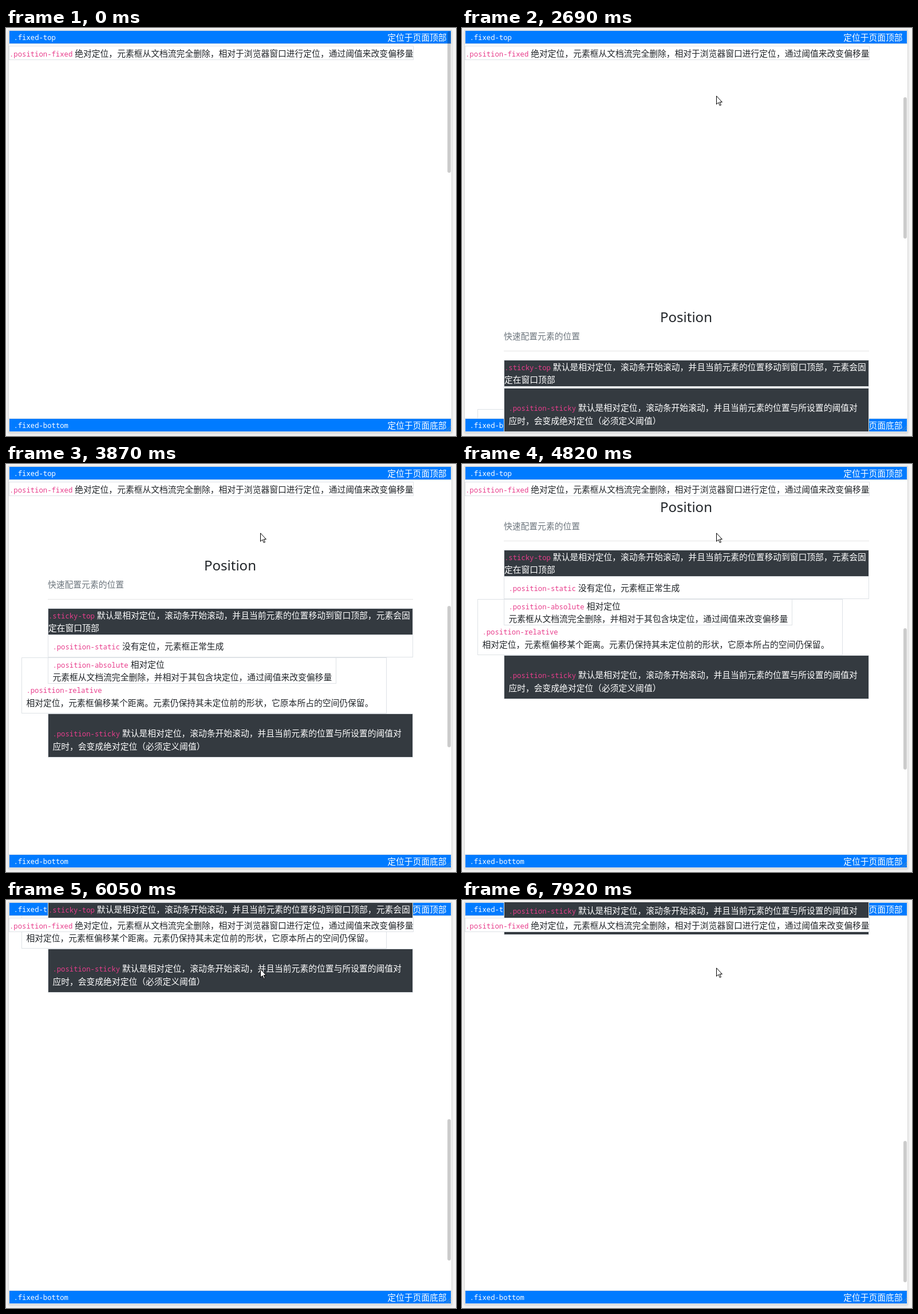
Write an HTML page that moves like this. It is 786 px wide and 713 px high and loops after 8000 ms.

```html
<!DOCTYPE html>
<html lang="zh-CN">
<head>
<meta charset="utf-8">
<title>Position</title>
<style>
html, body { margin: 0; width: 100%; height: 100%; overflow: hidden; background: #f5f5f5; }
body {
  position: relative; color: #212529; white-space: nowrap;
  font: 14.79px/22.3px "Noto Sans CJK SC", "Noto Sans CJK", sans-serif;
}
div, h2, p, hr, svg { position: absolute; margin: 0; box-sizing: border-box; }
code { font: 12.25px/0 "Noto Sans Mono", monospace; color: #e83e8c; margin-right: 4px; }
#frame { left: 5px; top: 4px; width: 773px; height: 702px; background: #fff;
  box-shadow: 0 0 0 1px #ddd, 0 2px 4px 1px rgba(0, 0, 0, .13); }
#view { inset: 0; clip-path: inset(4px 8px 7px 5px); }
#flow { left: 0; top: 0; width: 786px; }
h2 { left: 73px; top: 789px; width: 637px; text-align: center; font: 24px/32px "Noto Sans", sans-serif; }
p { left: 73px; top: 827px; color: #6c757d; }
hr { left: 73px; top: 864px; width: 638px; height: 1px; border: 0; background: #e5e5e5; }
.box { border: 1px solid #dee2e6; left: 73px; width: 638px; padding: 0 7.4px; }
.dark { background: #343a40; color: #fff; top: 0; }
.bar { left: 5px; width: 773px; height: 24px; background: #007bff; color: #fff;
  display: flex; justify-content: space-between; }
.bar code { color: #fff; line-height: inherit; padding-top: 1px; }
#thumb { left: 771px; top: 5.5px; width: 6px; height: 247px; border-radius: 3px; background: rgba(0, 0, 0, .2); }
#cursor { left: 0; top: 0; }
</style>
</head>
<body>
<div id="frame"></div>
<div id="view">
  <div id="flow">
    <h2>Position</h2>
    <p>快速配置元素的位置</p>
    <hr>
    <div class="box" style="top:926px;height:40px;padding-top:8px"><code>.position-static</code>没有定位，元素框正常生成</div>
    <div class="box" style="left:27px;top:966px;height:98px;padding-top:44.4px"><code>.position-relative</code><br>相对定位，元素框偏移某个距离。元素仍保持其未定位前的形状，它原本所占的空间仍保留。</div>
    <div class="box" style="top:966px;width:504px;height:46px"><code>.position-absolute</code>相对定位<br>元素框从文档流完全删除，并相对于其包含块定位，通过阈值来改变偏移量</div>
  </div>
  <div class="box bar" style="top:4px"><code>.fixed-top</code>定位于页面顶部</div>
  <div class="box bar" style="top:682px"><code>.fixed-bottom</code>定位于页面底部</div>
  <div id="stickyTop" class="box dark" style="height:47px;padding:0"><code>.sticky-top</code>默认是相对定位，滚动条开始滚动，并且当前元素的位置移动到窗口顶部，元素会固<br>定在窗口顶部</div>
  <div id="sticky" class="box dark" style="height:77px;padding-top:22.4px"><code>.position-sticky</code>默认是相对定位，滚动条开始滚动，并且当前元素的位置与所设置的阈值对<br>应时，会变成绝对定位（必须定义阈值）</div>
  <div class="box" style="left:5px;top:31px;width:707px;height:25px;padding:1px 0 0;background:#fff"><code>.position-fixed</code>绝对定位，元素框从文档流完全删除，相对于浏览器窗口进行定位，通过阈值来改变偏移量</div>
  <div id="thumb"></div>
  <svg style="left:767px;top:694px" width="11" height="11" fill="none" stroke="rgba(150,150,150,.7)"><path d="M1 10.5 10.5 1M5 10.5 10.5 5"/></svg>
</div>
<svg id="cursor" width="12" height="19" fill="#fff" stroke="#000"><path d="M.5 .8V15.3L3.9 12.2 6.3 17.5 8.4 16.6 6.1 11.5H10.4Z"/></svg>
<script>
const LOOP = 8000, STEP = 135, PHASE = 620;
const TOP = 4, BOTTOM = 706;
const START = 790, END = 1141;  // extent of the container holding the sticky boxes
const POINTER_IN = 680;

// Each gesture: start time, duration, distance
const wheel = [[2195, 600, 355.5], [3090, 400, 227.5], [3674, 440, 117], [4654, 465, 120],
  [5066, 330, 114], [5873, 350, 117], [6560, 400, 124], [7640, 540, -190]];
const pointerX = [[620, 270, 11], [1100, 400, 2]];
const pointerY = [[620, 270, -10], [1200, 400, -2], [2150, 90, 5], [3100, 80, 2], [7640, 130, -2]];

const $ = id => document.getElementById(id);
const clamp = (v, lo, hi) => Math.min(Math.max(v, lo), hi);
const ease = u => u * u * (3 - 2 * u);
const travel = (gestures, t) => Math.round(gestures.reduce(
  (sum, [start, length, distance]) => sum + distance * ease(clamp((t - start) / length, 0, 1)), 0));
const move = (id, y, x = 0) => $(id).style.transform = `translate(${x}px, ${y}px)`;

function draw(t) {
  const held = Math.floor((t - PHASE) / STEP) * STEP + PHASE;
  const scroll = travel(wheel, held);
  move("flow", -scroll);
  move("stickyTop", Math.min(Math.max(880 - scroll, TOP), END - 47 - scroll));
  move("sticky", Math.max(Math.min(1064 - scroll, BOTTOM - 77), START - scroll));
  move("thumb", Math.round(scroll / 2.6));
  move("cursor", 125 + travel(pointerY, held), 431 + travel(pointerX, held));
  $("cursor").style.visibility = t < POINTER_IN ? "hidden" : "visible";
}

const begin = performance.now();
function tick() {
  draw((performance.now() - begin) % LOOP);
  requestAnimationFrame(tick);
}
tick();
</script>
</body>
</html>
```
